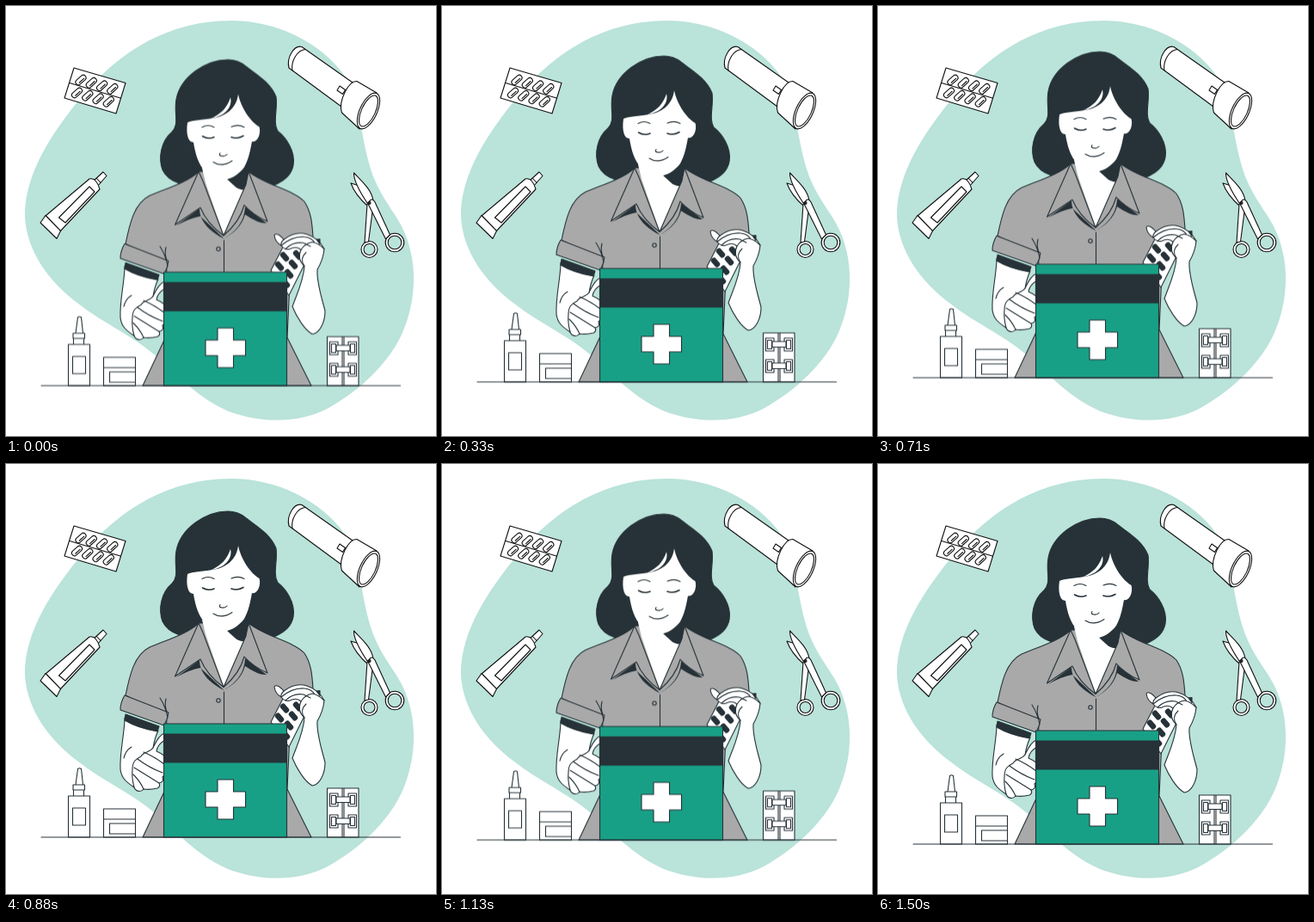
An HTML page for the animation above (1.54 s loop, 500 by 500 pixels).

```html
<!DOCTYPE html>
<html lang="en">
<head>
<meta charset="utf-8">
<title>First aid kit</title>
<style>
  html, body { margin: 0; width: 100%; height: 100%; overflow: hidden; background: #fff; }
  svg { display: block; width: 100%; height: 100%; }
  .art { fill: #fff; stroke: #263238; stroke-width: 1.1; stroke-linejoin: round; stroke-linecap: round; }
  .ink { stroke: #111; }
  .line { fill: none; }
  .dark { fill: #263238; }
  .flat { stroke: none; }
  .grey { fill: #a9a9a9; }
  .teal { fill: #18a086; }
  .mint { fill: #bae3da; }
  #bob { animation: bob 1540ms linear -40ms infinite; }
  @keyframes bob {
    0%, 100% { transform: translateY(1px); }
    50% { transform: translateY(-9px); }
  }
</style>
</head>
<body>
<svg viewBox="0 0 500 500">
  <defs>
    <g id="pill" transform="rotate(-42)">
      <rect x="-7" y="-3.200" width="14" height="6.400" rx="3.200"/>
      <path d="M-3.500 1.200H4"/>
    </g>
    <g id="row">
      <use href="#pill" x="0" transform="translate(87 86)"/>
      <use href="#pill" transform="translate(99.3 89.3)"/>
      <use href="#pill" transform="translate(111.6 92.8)"/>
      <use href="#pill" transform="translate(123.8 96.3)"/>
    </g>
    <g id="clasp">
      <path d="M376.500 390h9.500v15h-9.500zM378.500 392.500h5v10h-5zM398 390h9.500v15h-9.500zM400.500 392.500h5v10h-5z"/>
      <path d="M384 394h16v6.500h-16z"/>
    </g>
    <rect id="tab" x="-6" y="-3.300" width="12" height="6.600" rx="2.800" transform="rotate(50)"/>
  </defs>

  <path class="mint" d="M262 17C313 17 366 41 395 83C415 117 412 165 430 205C442 232 458 246 466 270C478 303 477 343 461 380C446 414 412 447 374 468C341 485 298 486 258 471C218 453 200 428 172 405C146 383 112 368 84 346C50 321 24 285 22 245C21 195 55 145 90 103C125 62 180 17 262 17Z"/>

  <g class="art ink">
    <!-- blister pack -->
    <path d="M79 72L139 89.500L128 125L68 107Z"/>
    <path class="line" d="M74 89.500L133 107"/>
    <use href="#row"/>
    <use href="#row" x="-4.500" y="15"/>

    <!-- flashlight -->
    <path d="M344 47.500C335 45 326 60 329 72L390 117L403 89Z"/>
    <path class="line" d="M348 50.500C339 51 331 64 333 75"/>
    <path d="M388 93l6.500 4.500l-3 5l-6.500 -4.500z"/>
    <path d="M408 87.500C398 87 386 111 390.500 124L411 143L431 101Z"/>
    <ellipse cx="421.500" cy="122" rx="10" ry="22.500" transform="rotate(25 421.500 122)"/>
    <ellipse cx="421.500" cy="122" rx="8" ry="19.500" transform="rotate(25 421.500 122)"/>

    <!-- ointment tube -->
    <path d="M113 193L117 197.500L106 210L101 204Z"/>
    <path class="line" d="M105.500 200.500l4.500 5"/>
    <path d="M97 201Q105 199 109 213L63 262L46 244Z"/>
    <path d="M46 243.500L40 252L59 270.500L63.500 261.500Z"/>
    <path d="M97 210L103 216L69 252L61.500 246Z"/>

    <!-- scissors -->
    <circle cx="422.500" cy="283" r="9.500"/>
    <circle class="mint" cx="422.500" cy="283" r="6.500"/>
    <circle cx="452" cy="275" r="10.800"/>
    <circle class="mint" cx="452" cy="275" r="7.800"/>
    <path d="M401 206L411 209L425 225L421 233Q406 220 401 206Z"/>
    <path d="M404.500 194C404 204 414 220 420 229L427 227C426 214 413 203 404.500 194Z"/>
    <path d="M420 230L417 275L421.500 274L427 232Z"/>
    <path d="M421 230L441.500 271L446.500 266L429 228Q425 221 421 230Z"/>
    <circle class="dark" cx="422.500" cy="229" r="1.500"/>
  </g>

  <g id="bob" class="art">
    <!-- hair and shirt -->
    <path class="dark" d="M258 62C232 62 203 82 198 108C195 125 202 137 193 146C180 157 177 176 182 190C189 205 210 211 232 207L280 212C305 213 330 205 334 185C337 168 325 152 316 145C310 135 316 120 314 105C307 88 291 79 278 69C272 64 265 62 258 62Z"/>
    <path class="grey" d="M224 192C212 204 186 212 167 220C149 229 144 252 139 276L187 300L184 388L159 441H355L327 385L330 320L357 268C356 253 355 239 347 227C334 213 302 208 282 192Z"/>
    <path class="flat" d="M228 188L232 205L253.500 267L279 207L281 185Z"/>
    <path class="dark flat" d="M256 200L286 165L281 213Q270 214 266 209Z"/>

    <!-- collar -->
    <path class="dark flat" d="M225 235C225 251 239 263 253.500 270C266 262 277 252 278 233L303 252Q294 253 278 242C274 256 264 264 253.500 270L226 244Q214 246 198 255Z"/>
    <path class="grey" d="M224 192L196.500 254Q211 244 226 234C231 246 240 257 253 266.500L229 203Z"/>
    <path class="grey" d="M282 192L304 250Q288 243 277 231C273 246 263 258 253 266.500L279 207Z"/>
    <path class="line" d="M253.500 272V309"/>
    <circle class="grey" cx="247" cy="282" r="2.200"/>

    <!-- face -->
    <path class="flat" d="M270 102C268 119 255 128 240 130C228 132 217 132 211 135C209 149 212 158 218 158C220 171 224 185 232 192C238 199 246 202 252 202C262 201 271 195 277 187C282 178 284 168 286 157C292 159 297 148 294.500 140C284 134 273 117 270 102Z"/>
    <path class="flat" d="M261 106C257 118 250 125 239 130C253 128 264 118 261 106Z"/>
    <path class="line" stroke-width="1.600" d="M228.500 151Q235 155 242 152M262 152Q269 154.500 276 150.500"/>
    <path class="line" d="M228 140.500Q235 136.500 242 140.500M262 140Q270 136.500 277 140.500M249 170.500Q247 173.500 251 174Q255 174.500 257 172M241 181Q251 187.500 263 179.500"/>

    <!-- left arm -->
    <path d="M138 302C138 320 132 342 133 362C134 372 140 377 149 383C151 388 157 389 160 385Q168 386 176 384Q180 382 178 378Q184 377 182 371L184 369V320C177 323 174 331 171 337Q173 325 177 317Z"/>
    <path class="mint" d="M185 328Q176 333 175 341Q180 343 185 347Z"/>
    <path class="line" d="M137 349Q139 340 146 336M171 337C167 343 160 341 157 347C151 350 147 353 147 362Q146 372 149 383M160 342Q172 347 184 356M153 350Q166 360 182 366M149 360Q162 368 178 378M148 368Q156 376 160 385"/>
    <path class="dark" d="M139 298L178 312L176 318Q153 314 138 305Z"/>
    <path class="grey" d="M138 276Q133 284 133 293L184 311Q188 303 189 296Z"/>
    <path class="line" d="M179 279Q186 290 188 302M186 280Q184 288 187 295"/>

    <!-- held pack -->
    <path d="M324 276L308 307L329 336L346 302L362 272Z"/>
    <g class="dark flat">
      <use href="#tab" transform="translate(324 291)"/>
      <use href="#tab" transform="translate(318 302)"/>
      <use href="#tab" transform="translate(339 289)"/>
      <use href="#tab" transform="translate(334 300)"/>
      <use href="#tab" transform="translate(329 311)"/>
      <use href="#tab" transform="translate(325 322)"/>
    </g>

    <!-- right arm -->
    <path d="M347 302C346 319 338 335 333 349C338 361 347 376 356 381C365 380 371 367 371 354C367 338 361 321 362 306Q369 294 370 282C366 274 359 268 350 265C341 262 331 265 323 271Q315 262 312 266Q313 274 320 278Q325 284 330 282Q338 278 343 283Q338 294 347 302Z"/>
    <path class="line" d="M323 271Q319 275 320 278M320 278Q333 267 347 268Q356 269 359 275M325 282Q334 273 346 275L354 279M343 283Q347 276 356 274Q363 275 370 282M347 302Q341 293 349 286"/>
    <path class="dark" d="M361 271l4 -.5v6z"/>

    <!-- kit box -->
    <path class="teal" d="M183.500 309H326.500V441H183.500Z"/>
    <path class="dark" d="M183.500 321H326.500V354H183.500Z"/>
    <path d="M246 374h18.500v14h14v18h-14v14h-18.500v-14h-14v-18h14z"/>

    <!-- bottle, jar, plasters -->
    <path d="M72.500 393H97.500V441H72.500ZM77.500 407H92.500V427H77.500ZM81 380L83.500 361.500Q85.500 360 87.500 361.500L89.500 380ZM78 380H91.500V386H78ZM78.500 386H90.500V393H78.500Z"/>
    <path d="M113.500 408H150.500V441H113.500ZM113.500 420H150.500M150.500 425H120.500V437H150.500"/>
    <path d="M373.500 384H410V441H373.500ZM391 384V441M393 384V441"/>
    <use href="#clasp"/>
    <use href="#clasp" y="25"/>
    <path class="line" d="M41 441H458.500"/>
  </g>
</svg>
</body>
</html>
```
